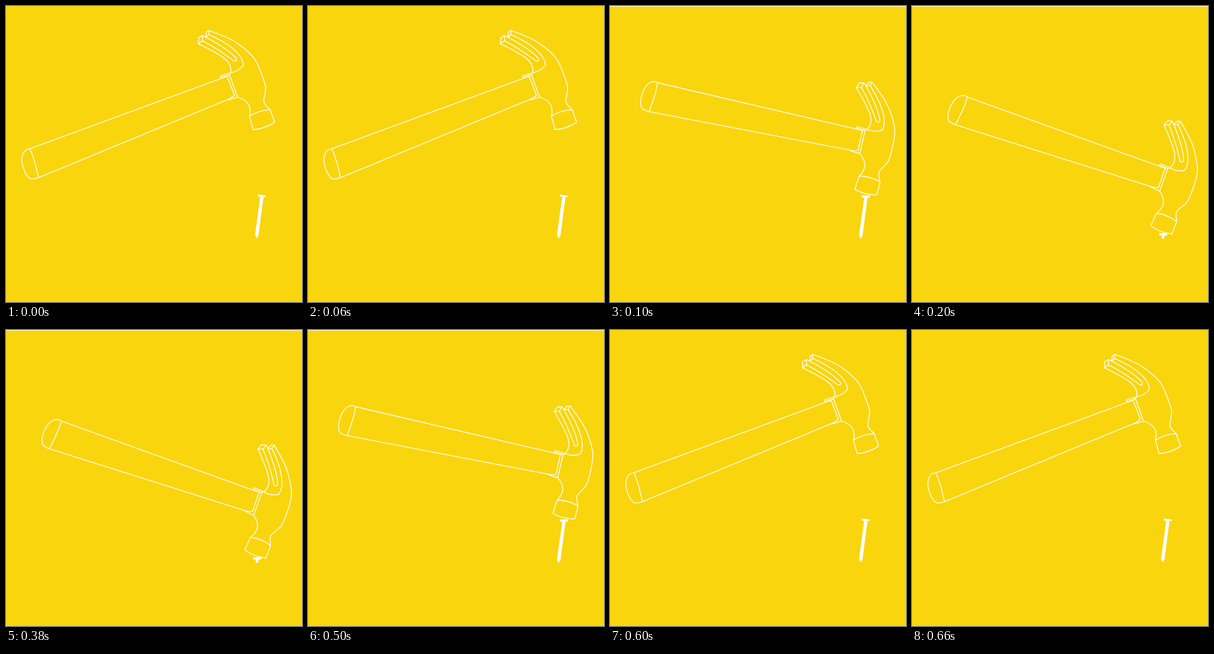
An HTML page that plays this animation: 400 by 400 pixels, repeating every 700 ms.

```html
<!DOCTYPE html>
<html lang="en">
<head>
<meta charset="utf-8">
<title>Hammer and nail</title>
<style>
  html, body { margin: 0; width: 100%; height: 100%; overflow: hidden; background: #f9d50e; }
  svg { display: block; width: 100%; height: 100%; }
</style>
</head>
<body>
<svg viewBox="0 0 400 400">
  <rect width="400" height="400" fill="#f9d50e"/>
  <rect id="edge" width="400" height="1" fill="#fdf3c0"/>
  <path id="nail" fill="#fff"/>
  <g id="hammer" fill="none" stroke="#fff" stroke-width="1.1" stroke-linejoin="round">
    <!-- handle -->
    <path d="M300 94.6L32 193C25 193 21 201 21.5 209C22 219 27 229 32 233Q36 235 44 232L303 125"/>
    <path d="M32 193C38 203 41 220 44 232"/>
    <!-- collar -->
    <path d="M290 97V94.5L303 90.5L302 93L290 97M299 95.5L308.800 120.800L300 127L313 123.300L302 93"/>
    <!-- head outline -->
    <path d="M303.500 90.500C305 82 302 77 296 71.500C287 64 272 57 260 51L260.500 43L265.500 40L270 42L270.500 35.500L274 33C290 39 302 43 312 50C322 57 332 65 337 73C343 84 349 101 351 110C351 117 348 124 348.500 130C350 134 354 137 357 140L363 157Q350 166 334 167L329 149C332 136 327 127 313 123.300"/>
    <path d="M329 149Q341 141 357 140"/>
    <!-- claw -->
    <path d="M303.500 90.500Q315 88 321 80C320 64 298 49 274 38.500V33M274 38.500L270 42C285 50 302 60 311.500 71Q312 75 308.500 74.500C298 67 287 58 265.500 47V40M265.500 47L260 51"/>
  </g>
</svg>
<script>
  const $ = id => document.getElementById(id);
  const LOOP = 700;

  const raised = {
    x: 209.4, y: 156.4, turn: 0, edge: 0,
    nail: "M340.300 254.700L351 256.200V258.300L348 258L341.200 310L338.700 314L336.500 309.500L343.500 258L340.300 257.500Z"
  };
  const touching = {
    x: 232.6, y: 170.4, turn: 33.3, edge: 1,
    nail: "M340.200 256H351V259H348L341.200 310.500L338.700 315L336.500 310L343.600 259H340.200Z"
  };
  const driven = {
    x: 234, y: 208.9, turn: 40, edge: 1,
    nail: "M334.300 307H344.800V310.200H341.300L340.800 314.500H337.500V310.200H334.300Z"
  };

  function poseAt(t) {
    if (t < 100 || t >= 600) return raised;
    return t < 200 || t >= 500 ? touching : driven;
  }

  function draw(now) {
    const p = poseAt(now % LOOP);
    $("hammer").setAttribute("transform",
      `translate(${p.x} ${p.y}) rotate(${p.turn}) translate(${-raised.x} ${-raised.y})`);
    $("nail").setAttribute("d", p.nail);
    $("edge").setAttribute("opacity", p.edge);
  }

  const start = performance.now();
  function tick() {
    draw(performance.now() - start);
    requestAnimationFrame(tick);
  }
  tick();
</script>
</body>
</html>
```
